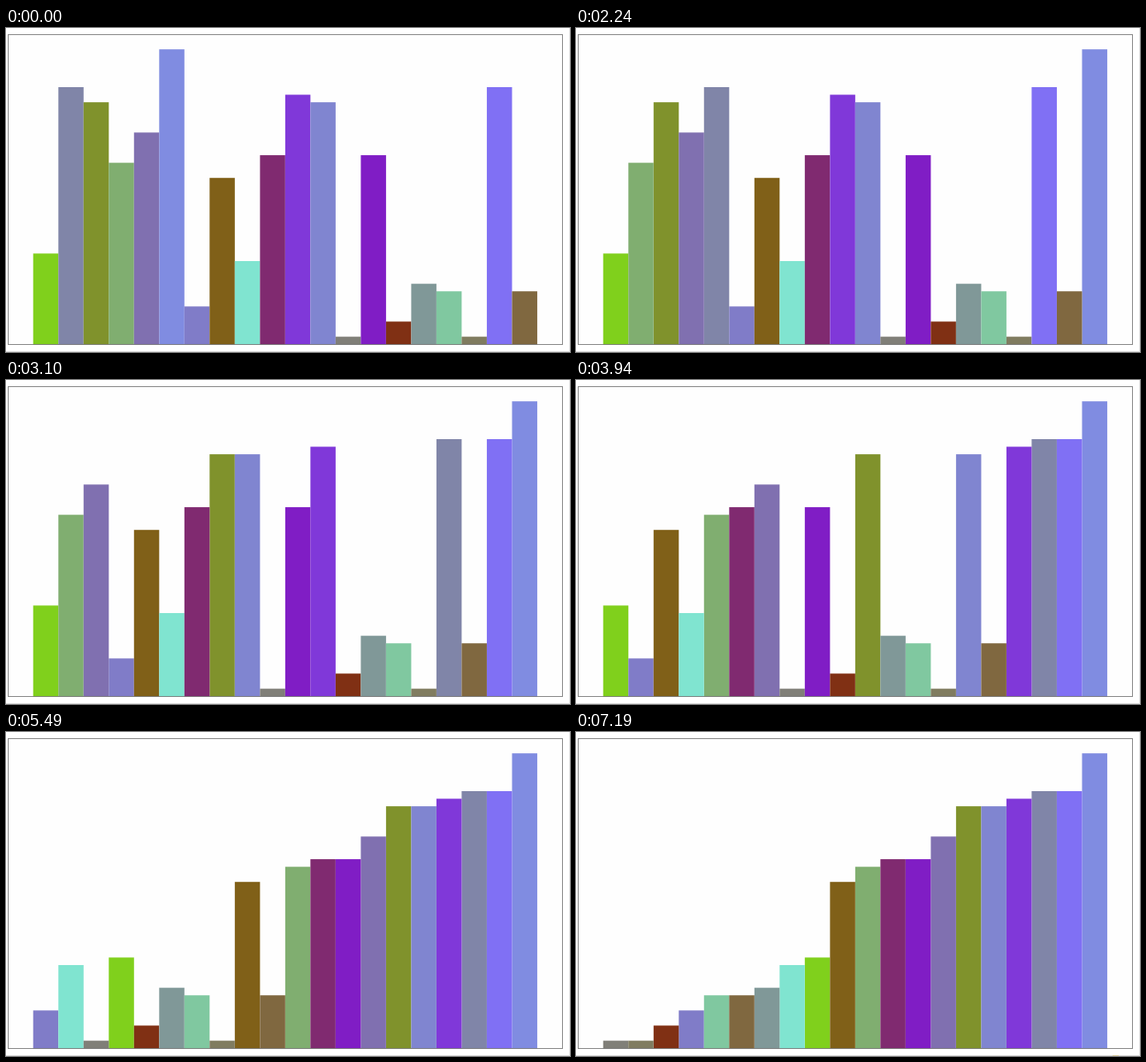
A matplotlib script that plays this animation: 638 px wide and 367 px high, repeating every 7.34 s.

```python
import numpy as np
import matplotlib.pyplot as plt
from matplotlib.animation import FuncAnimation
from matplotlib.patches import Rectangle

W, H = 638, 367
LOOP, TICK = 7340, 20
LEFT, STEP = 30.75, 28.51
BASE, UNIT = 358.2, 8.565

# The unsorted bars: value and colour
BARS = [(12, "#80d01c"), (34, "#8085a8"), (32, "#80922c"), (24, "#80ae70"),
        (28, "#8070b0"), (39, "#808ce1"), (5, "#807cc8"), (22, "#806018"),
        (11, "#80e4d0"), (25, "#802a70"), (33, "#8038d9"), (32, "#8085d0"),
        (1, "#807f78"), (25, "#801dc5"), (3, "#803014"), (8, "#809898"),
        (7, "#80c8a0"), (1, "#807c60"), (34, "#8070f4"), (7, "#806840")]


def bubble_sort_states(values):
    """Bar order after every swap, starting with the unsorted order."""
    order = list(range(len(values)))
    states = [tuple(order)]
    for end in range(len(order) - 1, 0, -1):
        for j in range(end):
            if values[order[j]] > values[order[j + 1]]:
                order[j], order[j + 1] = order[j + 1], order[j]
                states.append(tuple(order))
    return states


STATES = bubble_sort_states([value for value, _ in BARS])

# The screen repaints 61 times at a nearly even pace, on 10 ms steps.
repaint_ms = np.interp(range(1, 62), [1, 20, 31, 61], [1600, 3100, 3940, 6270])
repaint_ms = np.floor(repaint_ms / 10) * 10


def order_at(ms):
    """Just under two swaps pass between repaints."""
    repaints = np.searchsorted(repaint_ms, ms, side="right")
    swaps = int(1.94 * repaints + 0.95)
    return STATES[min(swaps, len(STATES) - 1)]


fig = plt.figure(figsize=(W / 64, H / 64), dpi=64, facecolor="white")
ax = fig.add_axes([0, 0, 1, 1])
ax.set_xlim(0, W)
ax.set_ylim(H, 0)
ax.axis("off")


def box(x, y, w, h, color, z=1, alpha=1):
    rect = Rectangle((x, y), w, h, facecolor=color, edgecolor="none",
                     linewidth=0, snap=False, zorder=z, alpha=alpha)
    return ax.add_patch(rect)


# Page edges and canvas
box(0, 366, W, 1, "#dcdcdc")
box(637, 0, 1, H, "#e4e4e4")
box(3, 8, 626, 350, "#fefefe")

bars = [box(0, BASE - UNIT * value, STEP, UNIT * value, color, z=2)
        for value, color in BARS]

# Canvas border
for y in (7, 358):
    box(2, y, 628, 1, "black", z=3, alpha=0.46)
for x in (2, 629):
    box(x, 8, 1, 350, "black", z=3, alpha=0.46)

speck = box(607, 366, 7, 1, "#d8cca0", z=4)


def update(i):
    ms = (i + 0.5) * TICK
    for slot, bar in enumerate(order_at(ms)):
        bars[bar].set_x(LEFT + STEP * slot)
    speck.set_visible(ms >= 7190)
    return bars + [speck]


anim = FuncAnimation(fig, update, frames=LOOP // TICK, interval=TICK,
                     repeat=True, repeat_delay=0, blit=False)
plt.show()
```
